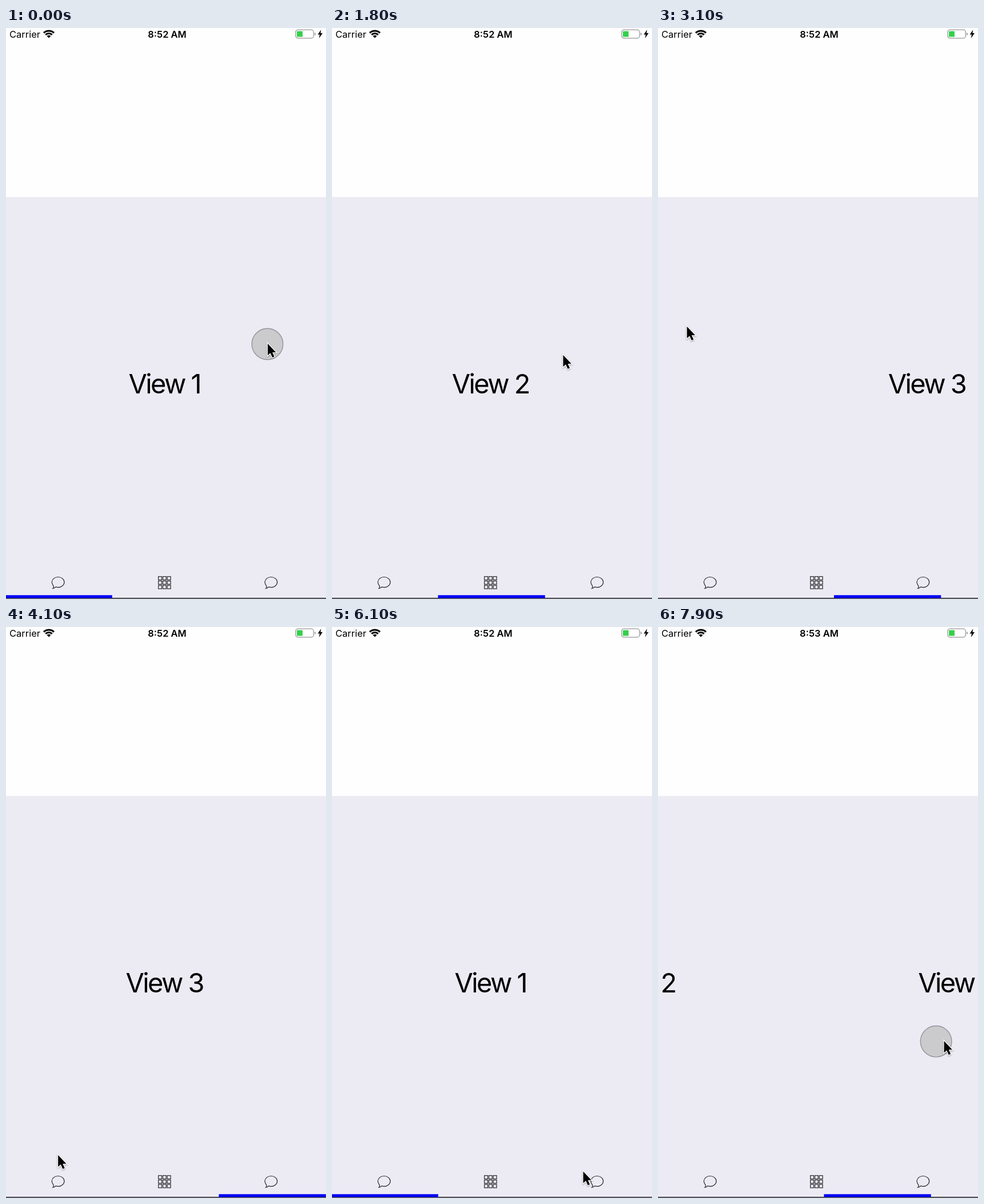
These frames come from a looping animation (560 by 1000 pixels, 8000 ms). An HTML page:

```html
<!DOCTYPE html>
<html lang="en">
<head>
<meta charset="utf-8">
<title>Paged views</title>
<style>
  html, body { margin: 0; width: 100%; height: 100%; overflow: hidden; background: #fffeff; }
  svg { display: block; width: 100%; height: 100%; }
  text { font-family: Inter, Roboto, sans-serif; text-anchor: middle; }
  .status { font-size: 16.5px; }
  .page { font-size: 47px; letter-spacing: -2.6px; }
  .line { fill: none; stroke: #262629; stroke-width: 1.2; }
  #cursor { filter: drop-shadow(0 1.5px 1.2px rgba(0, 0, 0, .35)); }
</style>
</head>
<body>
<svg viewBox="0 0 560 1000">
  <defs>
    <path id="bubble" class="line" d="M-9 10.5C-7 8.7-7.3 6.8-8.4 5.3C-10.2 3.2-11-1-10.7-1C-10.2-6-5.5-9.5 0-9.5C6-9.5 11-5.5 11-.5C11 4.5 6 8.6.3 8.6C-1.5 8.6-2.7 8.3-4 7.9C-5.2 9.2-7 10.3-9 10.5Z"/>
  </defs>
  <rect width="560" height="1000" fill="#fffeff"/>
  <rect y="296" width="560" height="704" fill="#ecebf4"/>

  <g class="status">
    <text x="6" y="17" style="text-anchor:start">Carrier</text>
    <text id="clock" x="282" y="17" font-weight="600">8:52 AM</text>
  </g>
  <g id="wifi" fill="none" stroke="#000"></g>
  <rect x="506.9" y="3.2" width="31.4" height="14.6" rx="4" fill="#fff" stroke="#96969a" stroke-width="1.3"/>
  <rect x="509" y="5.4" width="10" height="10.2" rx="1.2" fill="#35d04c"/>
  <path d="M540 8q2 .6 2 2.5t-2 2.5z" fill="#96969a"/>
  <path d="M551.4 3L545.6 11.6H549L547.8 18L554 9H550.4Z"/>

  <g id="pages" class="page"></g>

  <use href="#bubble" x="91" y="971"/>
  <use href="#bubble" x="463.7" y="971"/>
  <g id="grid" class="line"></g>
  <rect y="998" width="560" height="1.4" fill="#08080c"/>
  <rect id="bar" y="993.3" width="187.3" height="5" fill="#0000fe"/>

  <circle id="touch" r="27.3" fill="rgba(171,169,167,.5)" stroke="#949398" stroke-width="1.4"/>
  <path id="cursor" d="M.5 .8V21.3L5.1 17.2L8.6 25L12.1 23.6L8.7 16H14.9Z" stroke="#fff" stroke-width="2.6" paint-order="stroke"/>
</svg>
<script>
const LOOP = 8000, STEP = 100, PAGE = 560, TAB = 187;
const byId = id => document.getElementById(id);

function add(parent, tag, attrs, content = '') {
  const el = document.createElementNS('http://www.w3.org/2000/svg', tag);
  for (const key in attrs) el.setAttribute(key, attrs[key]);
  el.textContent = content;
  byId(parent).append(el);
}

// Three fan bands around one point
for (const [r, w] of [[12.7, 3], [8.1, 2.9], [2.4, 4.8]]) {
  const d = r * Math.SQRT1_2;
  add('wifi', 'path', { d: `M${75 - d} ${17.6 - d}A${r} ${r} 0 0 1 ${75 + d} ${17.6 - d}`, 'stroke-width': w });
}

for (let i = 0; i < 9; i++)
  add('grid', 'rect', { x: 266.7 + i % 3 * 7.8, y: 960.7 + Math.floor(i / 3) * 7.8, width: 5.8, height: 5.8 });

for (let i = 0; i < 3; i++)
  add('pages', 'text', { x: 277.2 + i * PAGE, y: 640 }, `View ${i + 1}`);

// Pointer moves: start, end, and the point reached
const moves = [
  [100, 680, 56, 541.5],
  [1100, 1800, 404, 572],
  [1800, 2000, 432, 564],
  [2500, 2980, 39, 520],
  [2980, 3250, 66, 525],
  [3250, 4300, 93, 962],
  [5300, 5880, 446, 961],
  [6000, 6800, 265, 742],
  [6800, 7000, 215, 726],
  [7350, 8050, 535, 724]
];

// Press and release times; a tap also says how many pages it scrolls
const swipes = [[0, 700], [2300, 3080], [7200, LOOP]];
const taps = [[4500, 4590, -2], [5900, 5990, 2]];
const DRAG_GAIN = .862, SETTLE = 120, TAP_DELAY = 180, TAP_SCROLL = 300, TOUCH_LAG = 28;

function ease(t, start, end) {
  const k = Math.min(1, Math.max(0, (t - start) / (end - start)));
  return (1 - Math.cos(Math.PI * k)) / 2;
}

function pointerAt(t) {
  let x = 457.5, y = 552;
  for (const [start, end, toX, toY] of moves) {
    const k = ease(t, start, end);
    x += (toX - x) * k;
    y += (toY - y) * k;
  }
  return [x, y];
}

// The page follows the finger, then settles exponentially on the next one
function swiped(t, [press, release]) {
  if (t < press) return 0;
  const drag = (pointerAt(press)[0] - pointerAt(Math.min(t, release))[0]) * DRAG_GAIN / PAGE;
  const goal = Math.sign(drag);
  return goal + (drag - goal) * Math.exp(-Math.max(0, t - release) / SETTLE);
}

function tapped(t, [, release, pages]) {
  const start = release + TAP_DELAY;
  return pages * ease(t, start, start + TAP_SCROLL);
}

function pageAt(t) {
  return swipes.reduce((sum, s) => sum + swiped(t, s), 0) + taps.reduce((sum, s) => sum + tapped(t, s), 0);
}

function place(id, x, y) {
  byId(id).setAttribute('transform', `translate(${x} ${y})`);
}

function draw(t) {
  const page = pageAt(t);
  const [touchX, touchY] = pointerAt(t - TOUCH_LAG);
  const pressed = [...swipes, ...taps].some(([press, release]) => t >= press && t <= release);
  place('pages', -page * PAGE, 0);
  place('cursor', ...pointerAt(t));
  place('touch', touchX, touchY + 1.5);
  byId('bar').setAttribute('x', page * TAB - 1.5);
  byId('touch').style.display = pressed ? '' : 'none';
  byId('clock').textContent = t < 7700 ? '8:52 AM' : '8:53 AM';
}

// The picture advances ten times a second
const start = performance.now();
function tick(now) {
  const t = Math.max(0, now - start) % LOOP;
  draw(Math.floor(t / STEP) * STEP);
  requestAnimationFrame(tick);
}
draw(0);
requestAnimationFrame(tick);
</script>
</body>
</html>
```
